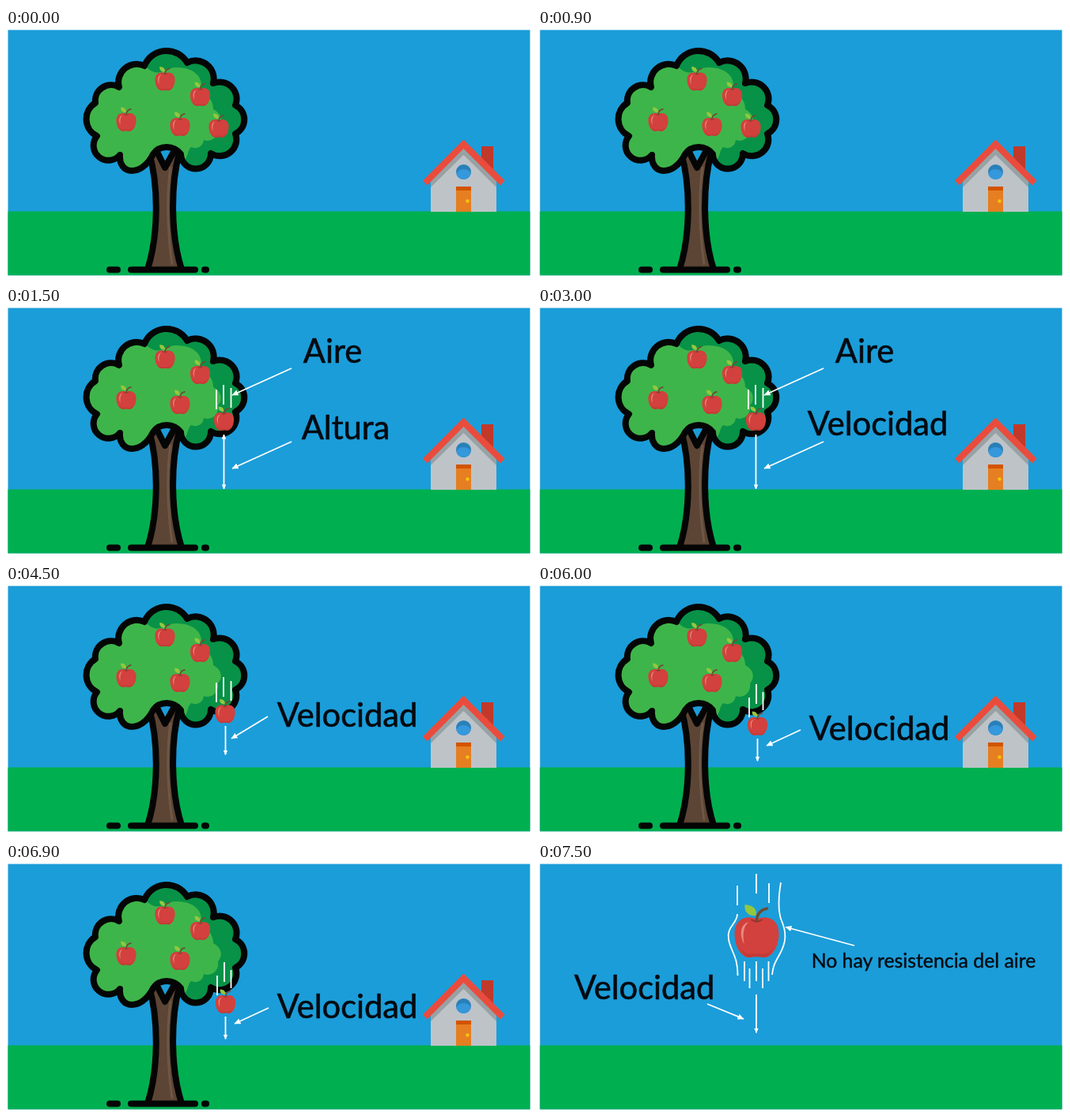
An HTML page for the animation above (8000 ms loop, 665 by 317 pixels).

```html
<!DOCTYPE html>
<html lang="es">
<head>
<meta charset="utf-8">
<title>Caída de una manzana</title>
<style>
  html, body { margin: 0; width: 100%; height: 100%; overflow: hidden; background: #fff; }
  svg { display: block; width: 100vw; height: 100vh; }
  text { font-family: Lato, "Open Sans", sans-serif; font-size: 41.6px; fill: #050a10; text-anchor: middle; stroke: #050a10; stroke-width: .6; }
  text.small { font-size: 24.8px; stroke-width: .4; }
  .air { stroke: #fff; stroke-width: 1.8; fill: none; }
  .ink { stroke: #050505; stroke-width: 8; fill: none; stroke-linecap: round; stroke-linejoin: round; }
</style>
</head>
<body>
<svg viewBox="0 0 665 317" xmlns="http://www.w3.org/2000/svg">
  <defs>
    <marker id="head" viewBox="0 0 8 8" refX="7.5" refY="4" markerWidth="8" markerHeight="8"
            markerUnits="userSpaceOnUse" orient="auto-start-reverse">
      <path d="M0 .3L8 4L0 7.7Z" fill="#fff"/>
    </marker>
    <marker id="tip" viewBox="0 0 8 8" refX="7.5" refY="4" markerWidth="6" markerHeight="6"
            markerUnits="userSpaceOnUse" orient="auto-start-reverse">
      <path d="M0 .3L8 4L0 7.7Z" fill="#fff"/>
    </marker>
    <g id="apple">
      <path d="M0-23C-7-28-28-28-28-5C-28 13-18 26-9 25C-5 24-3 24 0 24C3 24 5 24 9 25C18 26 28 13 28-5C28-28 7-28 0-23Z" fill="#d2413d"/>
      <path d="M-22 11C-15 22-8 21 0 20C8 21 15 22 22 11C18 21 13 25 9 25C5 24-5 24-9 25C-13 25-18 21-22 11Z" fill="#c43a37"/>
      <path d="M-10-20C-21-17-22-4-16 8C-18-5-17-14-10-20Z" fill="#ea8a7e"/>
      <path d="M-7-23Q0-18 7-23" fill="none" stroke="#a82e2c" stroke-width="2"/>
      <path d="M0-21C0-30 4-35 13-37" fill="none" stroke="#704a35" stroke-width="3.6" stroke-linecap="round"/>
      <path d="M-1-28C-12-27-16-34-15-42C-5-41 1-37-1-28Z" fill="#92c83e"/>
    </g>
    <clipPath id="stage"><rect x="2.5" y="2.5" width="660" height="311"/></clipPath>
    <path id="crown" d="M186 160C178 176 167 181 159 181C149 181 143 172 144 161A18 18 0 0 1 115 137
      A24 24 0 0 1 113 95A20 20 0 0 1 143 75A23 23 0 0 1 175 48A30 30 0 0 1 229 44A23 23 0 0 1 262 70
      A21.500 21.500 0 0 1 290 98A20 20 0 0 1 290 134A21 21 0 0 1 259 159A18.700 18.700 0 0 1 221 160C212 148 194 148 186 160Z"/>
    <clipPath id="inCrown"><use href="#crown"/></clipPath>
  </defs>
  <g clip-path="url(#stage)">
    <rect width="665" height="317" fill="#1b9dd9"/>
    <rect y="232.500" width="665" height="85" fill="#00b050"/>
    <g id="place">
      <g id="tree">
        <path d="M181 158C193 200 193 262 179 306H222C208 262 208 200 219 158L212 158L201 177L190 158Z" fill="#5c4535"/>
        <path d="M208 176C203 210 204 260 210 300" fill="none" stroke="#6f5745" stroke-width="3"/>
        <path class="ink" d="M181 158C193 200 193 262 179 306M219 158C208 200 208 262 222 306"/>
        <path class="ink" d="M191 157L201 177L212 157"/>
        <path class="ink" d="M131 306.500H141M158 306.500H239M251 306.500H253"/>
        <use href="#crown" fill="#3eb54a"/>
        <path clip-path="url(#inCrown)" fill="#079247" d="M174 44C179 54 189 59 198 55C209 47 235 48 244 62C248 69 248 76 244 83
          C256 84 262 92 262 103C272 108 275 118 268 126C270 137 260 146 250 142C249 151 241 154 234 151C229 155 231 163 225 168
          L245 190L320 170V20H174Z"/>
        <use href="#crown" class="ink"/>
      </g>
      <g id="house">
        <rect x="601" y="150" width="15" height="36" fill="#c0392b"/>
        <path d="M537 233V191L578.500 150L620 191V233Z" fill="#bec3c8"/>
        <path d="M537 190L578.500 149L620 190V202L578.500 161L537 202Z" fill="#98a2a5"/>
        <path d="M527 193.500L578.500 141.500L630.500 193.500L625 199.500L578.500 153L532.500 199.500Z" fill="#e94c3d"/>
        <circle cx="578.500" cy="182.500" r="9.500" fill="#2980b9"/>
        <path d="M569.500 185.500A9.500 9.500 0 0 0 587.500 185.500Q586 179 578.500 179Q571 179 569.500 185.500Z" fill="#3498db"/>
        <rect x="569" y="201" width="19" height="32" fill="#e67e22"/>
        <rect x="569" y="201" width="19" height="5" fill="#d35400"/>
        <circle cx="583.500" cy="219.500" r="2.300" fill="#f1c40f"/>
      </g>
      <g id="fruit"></g>
    </g>
    <g id="notes"></g>
  </g>
</svg>
<script>
const LOOP = 8000, STEP = 1500;
const place = document.getElementById('place');
const notes = document.getElementById('notes');

const apple = (x, y, s = 0.45) =>
  `<use href="#apple" transform="translate(${x} ${y}) scale(${s})"/>`;
const line = (x1, y1, x2, y2, more = '') =>
  `<path class="air" d="M${x1} ${y1}L${x2} ${y2}" ${more}/>`;
const arrow = (...p) => line(...p, 'marker-end="url(#head)"');
const drop = (x, y1, y2, both) =>
  line(x, y1, x, y2, 'marker-end="url(#tip)"' + (both ? ' marker-start="url(#tip)"' : ''));
const streaks = (...list) => list.map(([x, y, h = 25]) => line(x, y, x, y + h)).join('');
const label = (x, y, s, cls = '') => `<text x="${x}" y="${y}" class="${cls}">${s}</text>`;

document.getElementById('fruit').innerHTML =
  [[201, 68], [245.5, 87.5], [152, 119.5], [220, 125.5]].map(p => apple(...p)).join('');

const falling = apple(275.5, 146.5) + streaks([266, 106], [275, 100], [284.5, 104]) +
  arrow(361, 79, 286, 113) + arrow(361, 172, 286, 206) + label(413, 72, 'Aire');

const scenes = [
  apple(269, 127.5),
  falling + drop(275.5, 163, 232, true) + label(429.5, 169, 'Altura'),
  falling + drop(275.5, 163, 232) + label(429.5, 164, 'Velocidad'),
  apple(277, 165) + streaks([266, 125], [275, 118], [284.5, 123]) +
    drop(277.5, 180, 216.5) + arrow(331, 168, 285, 196) + label(431.5, 181, 'Velocidad'),
  apple(277.5, 180.5) + streaks([267, 144], [276, 127], [284.5, 137, 23]) +
    drop(277.5, 196, 224.5) + arrow(332, 185, 289, 205) + label(431.5, 198, 'Velocidad'),
  apple(276.5, 96, 1) +
    streaks([252, 30], [276, 15], [292, 27], [261, 126], [267.5, 135], [276, 126], [284, 135], [291.5, 126]) +
    `<path class="air" d="M252 66C252 78 238 82 241 98C243 112 253 120 252.5 144"/>
     <path class="air" d="M307 26C303 50 304 62 307 72C315 90 314 102 305 118C298 130 297 134 296 143"/>` +
    drop(276, 168, 216.5) + arrow(400, 106, 313, 82.5) + arrow(214, 180, 260, 199) +
    label(134.5, 174, 'Velocidad') + label(487.5, 134, 'No hay resistencia del aire', 'small')
];

let shown = -1;
function draw(t) {
  const i = Math.floor((t % LOOP) / STEP);
  if (i === shown) return;
  shown = i;
  place.style.display = i === scenes.length - 1 ? 'none' : '';
  notes.innerHTML = scenes[i];
}

const start = performance.now();
function tick() {
  draw(performance.now() - start);
  requestAnimationFrame(tick);
}
tick();
</script>
</body>
</html>
```
